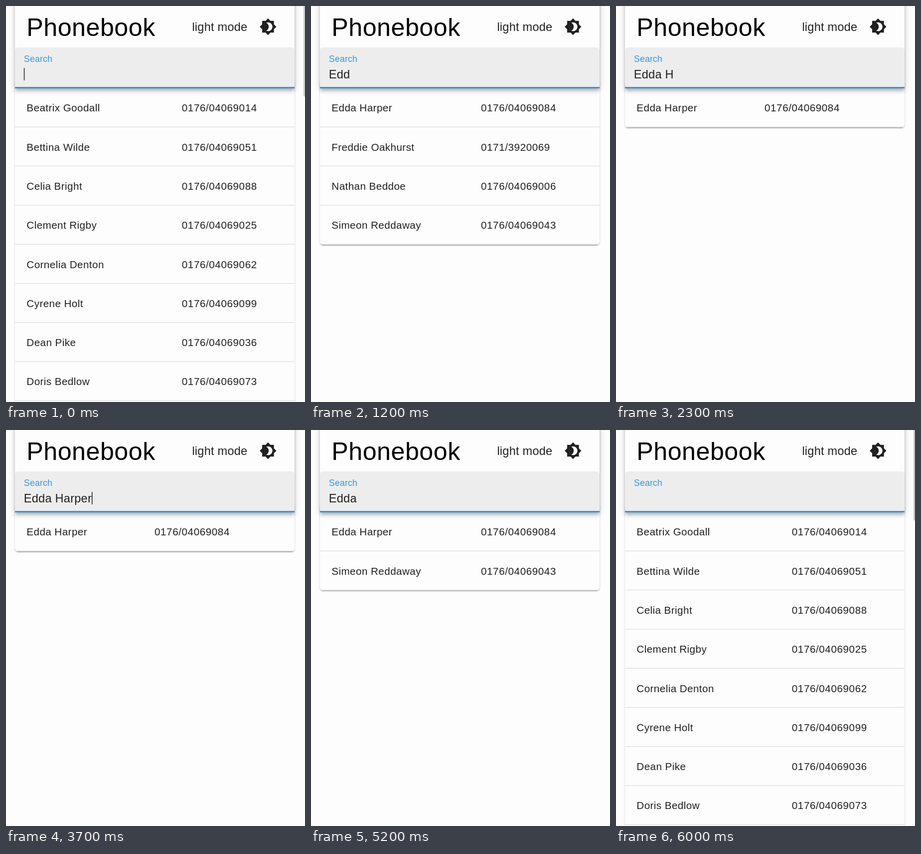
Recreate the animation shown at these times as an HTML page. Size 600x793 px, loop 6.1 s.

```html
<!DOCTYPE html>
<html lang="en">
<head>
<meta charset="utf-8">
<title>Phonebook</title>
<style>
  html, body { margin: 0; width: 100%; height: 100%; overflow: hidden; background: #fefdfe; }
  #stage { position: relative; width: 600px; height: 793px; overflow: hidden; }
  #card, #bar, #field, svg { position: absolute; }
  #card, #bar, #field { left: 18px; width: 561px; }
  #card {
    top: 150px; border-radius: 6px; background: #fefdfe;
    box-shadow: 0 3px 1.5px -1.5px #0003, 0 1.5px 1.5px #00000024, 0 1.5px 4.4px #0000001f;
  }
  #bar {
    top: -20px; height: 185px; background: #fefdfe;
    box-shadow: 0 3px 6px -1.5px #0003, 0 6px 7px #00000024, 0 1.5px 15px #0000001f;
  }
  #field {
    top: 83px; height: 82px; box-sizing: border-box;
    background: #ededee; border-radius: 6px 6px 0 0; border-bottom: 3px solid #3498db;
  }
  svg { left: 0; top: 0; }
  text { font-family: "Liberation Sans", Arial, sans-serif; fill: #212121; white-space: pre; }
  .title { font-size: 50.2px; letter-spacing: .5px; fill: #000; }
  .body { font-size: 23.6px; letter-spacing: .22px; }
  .label { font-size: 17.7px; letter-spacing: .17px; fill: #3498db; }
  .name { font-size: 20.7px; letter-spacing: .4px; }
  .phone { font-size: 20.7px; letter-spacing: .55px; }
</style>
</head>
<body>
<div id="stage">
  <div id="card"></div>
  <div id="bar"></div>
  <div id="field"></div>
  <svg width="600" height="793" viewBox="0 0 600 793">
    <text class="title" x="41.3" y="60">Phonebook</text>
    <text class="body" x="373.4" y="50">light mode</text>
    <path transform="translate(508.1 23.8) scale(1.476)" fill="#212121" d="M20 8.69V4h-4.69L12 .69 8.69 4H4v4.69L.69 12 4 15.31V20h4.69L12 23.31 15.31 20H20v-4.69L23.31 12 20 8.69zM12 18c-.89 0-1.74-.2-2.5-.55C11.56 16.5 13 14.42 13 12s-1.44-4.5-3.5-5.45C10.26 6.2 11.11 6 12 6c3.31 0 6 2.69 6 6s-2.69 6-6 6z"/>
    <text class="label" x="36" y="112">Search</text>
    <text class="body" id="query" x="35.8" y="144.5"></text>
    <rect id="caret" y="124" width="1.5" height="25" fill="#212121"/>
    <g id="rows"></g>
    <rect id="thumb" x="597" width="3" fill="#c8c8c8"/>
  </svg>
</div>
<script>
const LOOP = 6100;
const ROW_TOP = 164.7;
const ROW_HEIGHT = 78.3;
const VISIBLE_ROWS = 8;
const TERM = 'Edda Harper';

// Moments of each key press and each backspace, in ms
const TYPED = [400, 700, 1000, 1500, 1900, 2200, 2500, 2700, 3000, 3300, 3600];
const ERASED = [4400, 4500, 4600, 4800, 4900, 5000, 5200, 5300, 5500, 5600, 5800];
const CARET_ON = [[0, 300], [3600, 4150], [4400, 5200]];
const THUMB_HEIGHT = [181, 190, 663];

const contacts = [
  'Beatrix Goodall', 'Bettina Wilde', 'Celia Bright', 'Clement Rigby',
  'Cornelia Denton', 'Cyrene Holt', 'Dean Pike', 'Doris Bedlow',
  'Dorothy Tedman', 'Dulcie Ledson', 'Edda Harper', 'Enid Redmore',
  'Ernie Bedley', 'Fay Redland', 'Flora Ledbrook', 'Freddie Oakhurst',
  'Nathan Beddoe', 'Simeon Reddaway'
].map((name, i) => {
  const prefix = name.startsWith('Freddie') ? '0171/39200' : '0176/040690';
  return { name, phone: prefix + String((i * 37 + 14) % 100).padStart(2, '0') };
});

const $ = id => document.getElementById(id);

function svgNode(tag, attrs, parent) {
  const node = document.createElementNS('http://www.w3.org/2000/svg', tag);
  for (const key in attrs) node.setAttribute(key, attrs[key]);
  return parent.appendChild(node);
}

const rows = Array.from({ length: VISIBLE_ROWS }, (_, i) => {
  const group = svgNode('g', {}, $('rows'));
  const top = ROW_TOP + i * ROW_HEIGHT;
  const y = top + 46.6;
  svgNode('rect', { x: 18, y: top + ROW_HEIGHT - 1.5, width: 561, height: 1.5, fill: '#e1e0e4' }, group);
  return {
    group,
    name: svgNode('text', { class: 'name', x: 41.3, y }, group),
    phone: svgNode('text', { class: 'phone', y }, group)
  };
});

function phoneColumn(length, count) {
  if (length < 2) return 352.8;
  return count > 1 ? 341 : 298;
}

function showQuery(length) {
  const query = TERM.slice(0, length);
  const found = contacts.filter(c => c.name.toLowerCase().includes(query.toLowerCase()));
  const column = phoneColumn(length, found.length);
  $('query').textContent = query;
  $('caret').setAttribute('x', 35.8 + (length ? $('query').getComputedTextLength() : 0));
  $('thumb').setAttribute('height', THUMB_HEIGHT[length] || 0);
  $('card').style.height = ROW_TOP + found.length * ROW_HEIGHT - 150 + 'px';
  rows.forEach((row, i) => {
    const contact = found[i];
    row.group.style.display = contact ? '' : 'none';
    if (!contact) return;
    row.name.textContent = contact.name;
    row.phone.textContent = contact.phone;
    row.phone.setAttribute('x', column);
  });
}

let shownLength = -1;

function render(time) {
  const passed = moments => moments.filter(m => m <= time).length;
  const length = passed(TYPED) - passed(ERASED);
  if (length !== shownLength) showQuery(shownLength = length);
  const caretOn = CARET_ON.some(([from, to]) => time >= from && time < to);
  $('caret').style.display = caretOn ? '' : 'none';
}

function tick() {
  render(performance.now() % LOOP);
  requestAnimationFrame(tick);
}

render(0);
requestAnimationFrame(tick);
</script>
</body>
</html>
```
